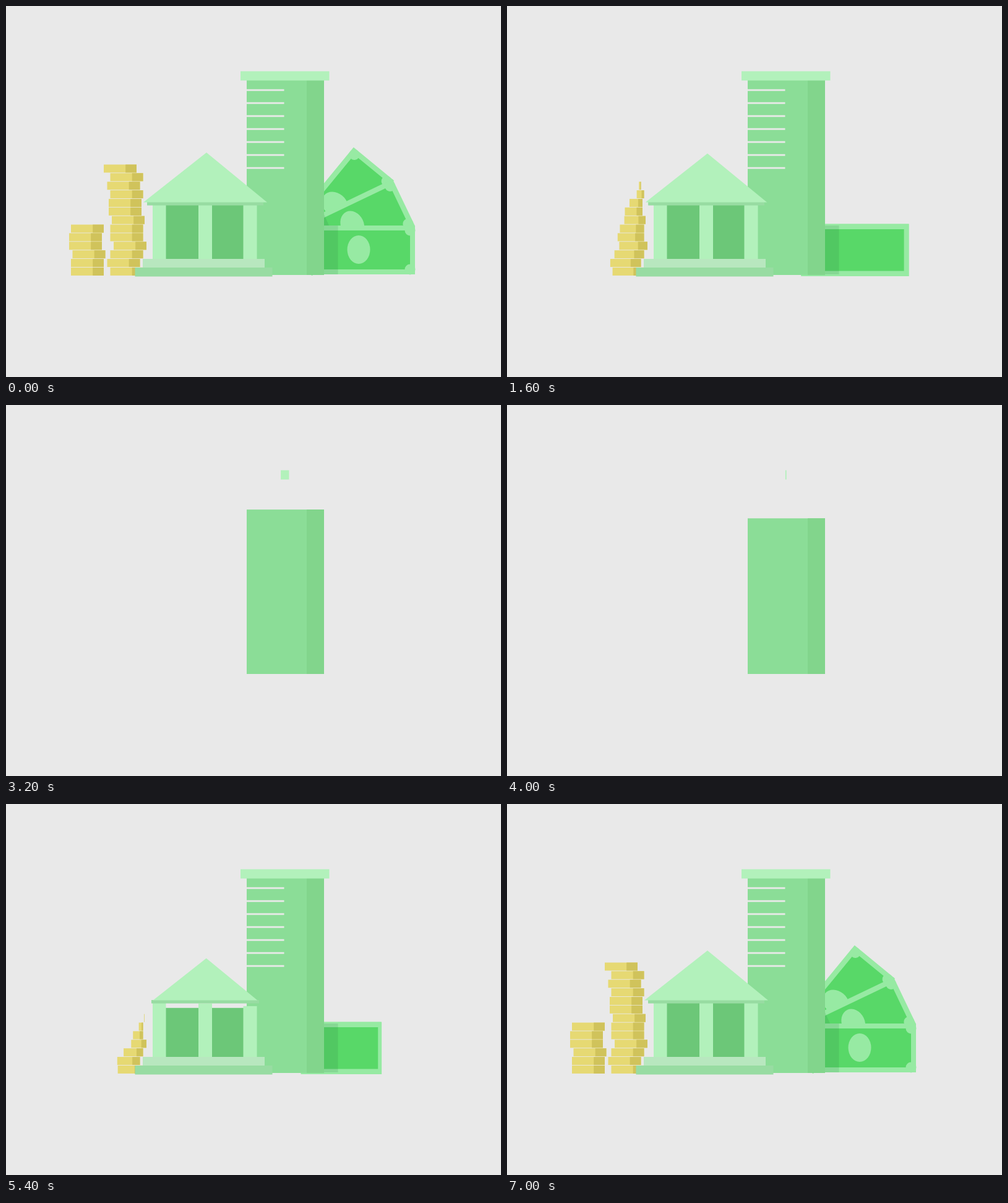
Write an HTML page with a canvas that moves like this. It is 800 by 600 pixels and loops after 7.2 s.

```html
<!DOCTYPE html>
<html lang="en">
<head>
<meta charset="utf-8">
<title>Bank, coins and notes</title>
<style>
  html, body { margin: 0; width: 100%; height: 100%; overflow: hidden; background: #e9e9e9; }
  canvas { display: block; width: 800px; height: 600px; }
</style>
</head>
<body>
<canvas id="stage" width="800" height="600"></canvas>
<script>
const ctx = document.getElementById('stage').getContext('2d');

const LOOP = 7200, STEP = 200, TURN = 3621;   // builds up after TURN, mirrored before it
const DUR = 800, LAG = DUR / 15;

const BG = '#e9e9e9', PALE = '#b2f1bb', WALL = '#8bdd97', SIDE = '#82d58c',
      DOOR = '#6cc778', TRIM = '#98dca2', TREAD = '#b8e7bf',
      GOLD = '#e6d973', RIM = '#d0c35b', PAPER = '#97eaa3', NOTE = '#58d868',
      SHADE = 'rgba(48,120,72,.16)';

const COINS_R = [168.5, 163.5, 168.5, 174, 168.5, 168.5, 171, 166, 166, 168.5, 163.5, 168.5, 158];
const COINS_L = [105, 105, 107.5, 102, 102, 105];

// cubic-bezier(.17, 0, .16, 1)
function ease(x) {
  if (x <= 0) return 0;
  if (x >= 1) return 1;
  let lo = 0, hi = 1, u = 0.5;
  for (let i = 0; i < 24; i++) {
    u = (lo + hi) / 2;
    const v = 1 - u;
    if (0.51 * u * v * v + 0.48 * u * u * v + u * u * u < x) lo = u; else hi = u;
  }
  return u * u * (3 - 2 * u);
}

let now = 0;
const grow = start => ease((now - start) / DUR);

function rect(color, x0, y0, x1, y1) {
  ctx.fillStyle = color;
  ctx.fillRect(x0, y0, x1 - x0, y1 - y0);
}

function poly(color, ...pts) {
  ctx.fillStyle = color;
  ctx.beginPath();
  for (let i = 0; i < pts.length; i += 2) ctx.lineTo(pts[i], pts[i + 1]);
  ctx.fill();
}

function oval(color, x, y, rx, ry) {
  ctx.fillStyle = color;
  ctx.beginPath();
  ctx.ellipse(x, y, rx, ry, 0, 0, Math.PI * 2);
  ctx.fill();
}

// Rectangle widening from a fixed x, or rising from its lower edge
function widen(color, p, x0, y0, x1, y1, from = (x0 + x1) / 2) {
  if (p > 0) rect(color, from + (x0 - from) * p, y0, from + (x1 - from) * p, y1);
}
function rise(color, p, x0, y0, x1, y1) {
  if (p > 0) rect(color, x0, y1 - (y1 - y0) * p, x1, y1);
}

function bill({ x0, y0, x1, y1, edge, pivot, scale, angle = 0, detail = 1, ovalY }) {
  if (scale <= 0) return;
  ctx.save();
  ctx.translate(pivot, 395);
  ctx.rotate(-angle * Math.PI / 180);
  ctx.scale(scale, 1);
  ctx.translate(-pivot, -395);
  rect(PAPER, x0, y0, x1, y1);
  rect(NOTE, x0 + edge, y0 + edge, x1 - edge, y1 - edge);
  if (detail > 0) {
    for (const y of [y0 + edge, y1 - edge])
      oval(PAPER, x1 - edge, y, 8.5 * detail, 8.5 * detail);
    oval(PAPER, 570, ovalY, 18.5 * detail, 23 * detail);
  }
  ctx.restore();
}

function bills() {
  const back = { x0: 475, y0: 352.5, x1: 660.5, y1: 437, edge: 8.5,
                 scale: grow(1482), detail: grow(2025) };
  const fan = grow(2400);
  bill({ ...back, pivot: 480, angle: 50.6 * grow(2450), ovalY: 388 });
  bill({ ...back, pivot: 483, angle: 25.6 * fan, ovalY: 391 });
  if (fan > 0.9) poly(SHADE, 514, 337, 522, 355, 514, 355);
  bill({ x0: 479, y0: 355, x1: 661, y1: 434, edge: 8, pivot: 483,
         scale: grow(1960), ovalY: 394 });
  const reach = Math.min(536.5, 483 + 177.5 * back.scale);
  if (reach > 514) rect(SHADE, 514, 355, reach, 434);
}

function tower() {
  const p = grow(10);
  rise(WALL, p, 389, 120, 514, 435);
  rise(SIDE, p, 486, 120, 514, 435);
  widen(PALE, grow(354), 379, 105.5, 522.5, 120.5);
  for (let i = 0; i < 7; i++) {
    const y = 136 + 21 * i;
    widen(BG, grow(409 + i * LAG), 389, y - 1.4, 449.5, y + 1.4, 389);
  }
}

function stack(coins, start) {
  coins.forEach((x, i) => {
    const y = 422.9 - 13.87 * i, p = grow(start + i * LAG), end = x + 53;
    widen(GOLD, p, x, y, end, y + 13, end);
    widen(RIM, p, end - 17.8, y, end, y + 13, end);
  });
}

function temple() {
  const door = grow(1315), roof = grow(1368);
  widen(TRIM, grow(525), 208.5, 423, 430.5, 437.5);
  widen(TREAD, grow(584), 221, 409, 418, 423);
  rise(DOOR, door, 258, 320, 311, 409);
  rise(DOOR, door, 333, 320, 384, 409);
  [[237, 258.5], [311, 333], [383.5, 405.5]].forEach(([a, b], i) =>
    rise(PALE, grow(1060 + i * 104), a, 320, b, 409));
  widen(TRIM, grow(1262), 228, 317, 416, 322.5);
  if (roof > 0)
    poly(PALE, 322 - 100 * roof, 317.5, 322 + 2 * roof, 317.5 - 80.5 * roof, 322 + 100 * roof, 317.5);
}

function draw(time) {
  const t = Math.floor(time % LOOP / STEP) * STEP;
  now = Math.abs(t - TURN);
  rect(BG, 0, 0, 800, 600);
  bills();
  tower();
  stack(COINS_L, 2030);
  stack(COINS_R, 1433);
  temple();
}

const begin = performance.now();
function tick() {
  draw(performance.now() - begin);
  requestAnimationFrame(tick);
}
tick();
</script>
</body>
</html>
```
